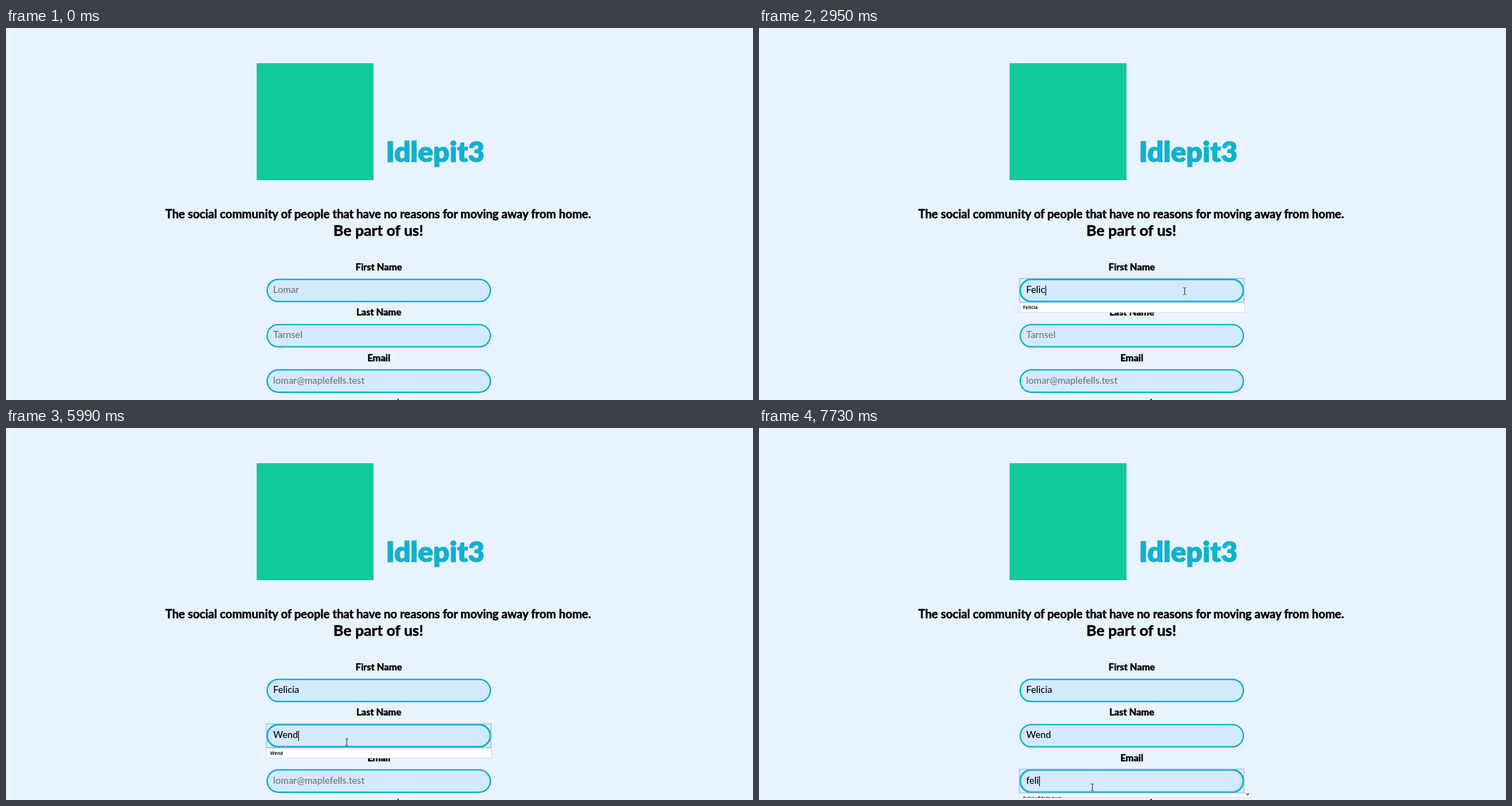
Write an HTML page that moves like this. It is 1061x528 px and loops after 8000 ms.

```html
<!DOCTYPE html>
<html lang="en">
<head>
<meta charset="utf-8">
<title>Sign up</title>
<style>
  html, body { margin: 0; width: 100%; height: 100%; overflow: hidden; background: #e9f3ff; }
  svg { display: block; width: 1061px; height: 528px; }
  text { font-family: Lato, sans-serif; }
  .head { font-weight: 700; text-anchor: middle; stroke: #000; stroke-width: .45; stroke-linejoin: round; }
  .label { font-size: 13.5px; }
  .brand { font-size: 40.3px; font-weight: 900; fill: #11b1cf; stroke: #11b1cf; stroke-width: 1; stroke-linejoin: round; }
  .box { fill: #d3e9ff; stroke: #06b1ca; stroke-width: 2; }
  .ring { fill: none; stroke: #7fb2f5; stroke-width: 1; }
  .value { font-size: 13.4px; font-weight: 500; }
  .hint { fill: #757575; }
  .small { font: 700 6.6px "Open Sans", sans-serif; fill: #111827; }
  .tip { font: 6.4px "Open Sans", sans-serif; fill: #8d939b; }
</style>
</head>
<body>
<svg id="stage" viewBox="0 0 1061 528" xmlns="http://www.w3.org/2000/svg">
  <rect width="1061" height="528" fill="#e9f3ff"/>
  <rect x="356" y="50" width="166" height="166" fill="#11cb9c"/>
  <text class="brand" x="539.5" y="190">Idlepit3</text>
  <text class="head" x="528.5" y="270" font-size="16.6">The social community of people that have no reasons for moving away from home.</text>
  <text class="head" x="529" y="295" font-size="21.6">Be part of us!</text>
  <rect x="556" y="526.5" width="1.8" height="2"/>
  <g id="form"></g>
  <g id="popup"></g>
  <g id="tip" opacity=".75">
    <rect x="608" y="382" width="75" height="10" fill="#9aa5b1" opacity=".6"/>
    <rect x="606.5" y="380.5" width="74.5" height="10" fill="#fff" stroke="#a9b0b8" stroke-width=".8"/>
    <text class="tip" x="609.5" y="387.8">Please fill out this field.</text>
  </g>
  <path id="beam" d="M-2-4.8H-.6L0-4.3.6-4.8H2M0-4.3V4.3M-2 4.8H-.6L0 4.3.6 4.8H2" fill="none" stroke="#3c4148" stroke-width="1"/>
  <path id="arrow" d="M0 0V11.2L2.6 8.8 4.4 13 6.2 12.2 4.4 8.1H8Z" fill="#fff" stroke="#111" stroke-width=".8"/>
</svg>
<script>
const LOOP = 8000;
const ROW = 13.4;
const TOP = 355.7;
const PITCH = 64.3;
const $ = id => document.getElementById(id);

// caretOff: span in which the blinking caret is dark
const fields = [
  { label: 'First Name', hint: 'Lomar', text: 'Felicia', focus: [1290, 4230],
    caretOff: [1750, 2180], keys: [2180, 2400, 2610, 2820, 2950, 3060, 3160] },
  { label: 'Last Name', hint: 'Tarnsel', text: 'Wend', focus: [4230, 6660],
    caretOff: [4780, 5000], keys: [5000, 5130, 5340, 5560] },
  { label: 'Email', hint: 'lomar@maplefells.test', text: 'feli', focus: [6660, LOOP],
    caretOff: [7090, 7300], keys: [7300, 7400, 7510, 7730] }
];

const mails = ['felicia', 'fern', 'finn', 'flora', 'frida', 'fritz'].map(n => n + '@fells.test');
const popups = [
  { span: [2180, 2400], y: 390, rows: ['Felicia', 'Fern'] },
  { span: [2400, 4230], y: 390, rows: ['Felicia'] },
  { span: [5000, 5130], y: 454.5, rows: ['Wend', 'Wolds', 'Wexler', 'Woman', 'wre'] },
  { span: [5130, 5340], y: 454.5, rows: ['Wend', 'Wexler'] },
  { span: [5340, 6660], y: 454.5, rows: ['Wend'] },
  { span: [7300, 7400], y: 403.5, rows: mails },
  { span: [7400, LOOP], y: 518.5, rows: mails.slice(0, 1), strip: true }
];

// start, end, number of jumps, destination
const moves = [
  [205, 840, 7, 613.5, 377],
  [970, 970, 1, 605, 374.5],
  [1520, 1520, 1, 604.5, 373.5],
  [3700, 4230, 6, 544, 449],
  [5880, 5990, 2, 484, 446],
  [6100, 6660, 6, 473.5, 510]
];

const within = (t, [a, b]) => t >= a && t < b;

function pointer(t) {
  let x = 875, y = 463;
  for (const [start, end, jumps, toX, toY] of moves) {
    if (t < start) break;
    const gap = jumps > 1 ? (end - start) / (jumps - 1) : 1;
    const u = Math.min(1, (Math.floor((t - start) / gap + 1e-6) + 1) / jumps);
    const k = u * (2 - u);
    x += (toX - x) * k;
    y += (toY - y) * k;
  }
  return { x, y };
}

function buildField(f, i) {
  const y = f.y = TOP + i * PITCH;
  const g = document.createElementNS('http://www.w3.org/2000/svg', 'g');
  g.innerHTML = `
    <text class="head label" x="529.5" y="${y - 11.8}">${f.label}</text>
    <rect class="box" x="371" y="${y + 1}" width="317" height="31.6" rx="15.8"/>
    <rect class="ring" x="370" y="${y}" width="318.8" height="33.6"/>
    <text class="value" x="379.5" y="${y + 20.2}"></text>
    <rect class="caret" y="${y + 9.6}" width="1" height="14.5"/>`;
  $('form').append(g);
  for (const name of ['box', 'ring', 'value', 'caret']) f[name] = g.querySelector('.' + name);
}

function drawField(f, t) {
  const typed = f.text.slice(0, f.keys.filter(k => t >= k).length);
  const shown = typed || f.hint;
  const focused = within(t, f.focus);
  if (f.value.textContent !== shown) f.value.textContent = shown;
  f.value.classList.toggle('hint', !typed);
  f.box.style.strokeWidth = focused ? 2.5 : 2;
  f.ring.style.display = focused ? '' : 'none';
  f.caret.style.display = focused && !within(t, f.caretOff) ? '' : 'none';
  f.caret.setAttribute('x', 379.5 + (typed ? f.value.getComputedTextLength() + .3 : 0));
}

function popupMarkup({ y, rows, strip }) {
  const width = strip ? 329 : 319.5;
  const height = strip ? 6 : rows.length * ROW + .4;
  const line = (s, i) => `<text class="small" x="375" y="${y + 9.4 + i * ROW}">${s}</text>`;
  const more = strip
    ? '<path d="M692 519l2 2 2-2" fill="none" stroke="#444" stroke-width="1.1"/>' +
      '<rect x="369" y="524.8" width="332" height="4" fill="#e9f3ff"/><rect x="556" y="526.5" width="1.8" height="2"/>'
    : '';
  return `<rect x="370.2" y="${y}" width="${width}" height="${height}" fill="#fff" stroke="#cfd6de" stroke-width=".8"/>` +
    rows.map(line).join('') + more;
}

let open;
function drawPopup(t) {
  const now = popups.find(p => within(t, p.span));
  if (now === open) return;
  open = now;
  $('popup').innerHTML = now ? popupMarkup(now) : '';
}

function drawPointer(t) {
  const { x, y } = pointer(t);
  const inField = x > 370 && x < 689 && fields.some(f => y > f.y && y < f.y + 33);
  for (const [id, on] of [['beam', inField], ['arrow', !inField]]) {
    $(id).style.display = on && t >= 100 ? '' : 'none';
    $(id).setAttribute('transform', `translate(${x} ${y})`);
  }
}

function render(t) {
  fields.forEach(f => drawField(f, t));
  drawPopup(t);
  $('tip').style.display = within(t, [1060, 1290]) ? '' : 'none';
  drawPointer(t);
}

function tick() {
  render(performance.now() % LOOP);
  requestAnimationFrame(tick);
}

fields.forEach(buildField);
tick();
</script>
</body>
</html>
```
